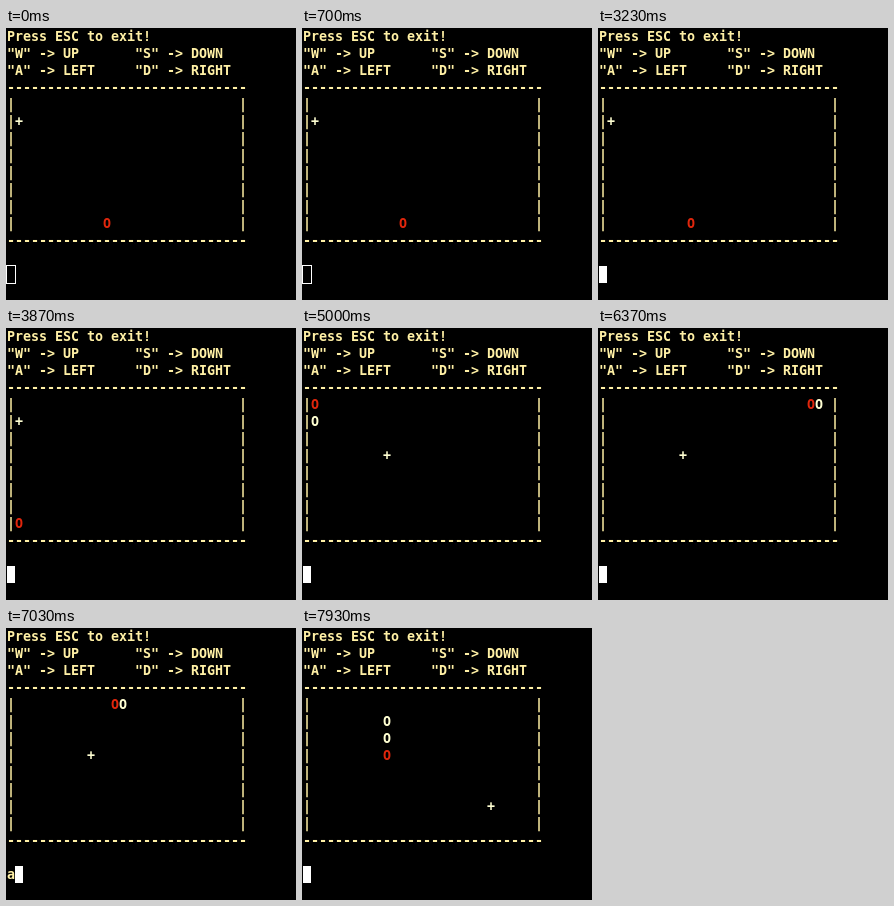
An HTML page with a canvas that plays this animation: 290 px wide and 272 px high, repeating every 8000 ms.

```html
<!DOCTYPE html>
<html lang="en">
<head>
<meta charset="utf-8">
<title>Terminal snake</title>
<style>
  html, body { margin: 0; width: 100%; height: 100%; overflow: hidden; background: #000; }
  canvas { display: block; }
</style>
</head>
<body>
<canvas id="screen" width="290" height="272"></canvas>
<script>
const ctx = document.getElementById('screen').getContext('2d');

const LOOP = 8000, TICK = 100 / 3, REPEAT = 47.8, FOCUS = 1500;
const CELL_W = 8, CELL_H = 17, LEFT = 1, BASELINE = 13;
const FIRST_COL = 1, LAST_COL = 28, PROMPT_ROW = 14;
const TEXT = '#fff0a5', PALE = '#ffffd2', HEAD = '#e0260c', CURSOR = '#fff';

const RULE = '-'.repeat(30);
const SIDE = '|' + ' '.repeat(28) + '|';
const BOARD = [
  'Press ESC to exit!',
  '"W" -> UP       "S" -> DOWN',
  '"A" -> LEFT     "D" -> RIGHT',
  RULE, ...Array(8).fill(SIDE), RULE
];

const DIRS = { w: [0, -1], a: [-1, 0], s: [0, 1], d: [1, 0] };
const FOODS = [[1, 5], [10, 7], [23, 10]];

// Key presses: start time, key, number of moves (held keys repeat)
const KEYS = [
  [2300, 'd', 1], [2700, 'a', 1], [3200, 'a', 11],
  [4100, 'w', 1], [4600, 'w', 6],
  [5430, 'a', 1], [5830, 'a', 1], [6366, 'a', 17],
  [7466, 's', 1], [7640, 's', 1], [7800, 's', 1]
];

function play(t) {
  let snake = [[12, 11]], eaten = 0, echo = '';
  for (const [start, key, count] of KEYS) {
    if (t < start) break;
    const pos = (t - start) / REPEAT;
    const moves = Math.min(count, Math.floor(pos) + 1);
    const [dx, dy] = DIRS[key];
    for (let i = 0; i < moves; i++) {
      let x = snake[0][0] + dx;
      const y = snake[0][1] + dy;
      if (x < FIRST_COL) x = LAST_COL;
      if (x > LAST_COL) x = FIRST_COL;
      snake.unshift([x, y]);
      const [fx, fy] = FOODS[eaten];
      if (x === fx && y === fy) eaten++;
      else snake.pop();
    }
    // The typed letter shows briefly before the next redraw
    echo = pos < count - 1 && pos % 1 > 0.8 ? key : '';
  }
  return { snake, food: FOODS[eaten], echo };
}

function put(text, col, row, color) {
  ctx.fillStyle = color;
  [...text].forEach((ch, i) => {
    if (ch !== ' ') ctx.fillText(ch, LEFT + (col + i) * CELL_W, row * CELL_H + BASELINE);
  });
}

function drawCursor(col, focused) {
  const x = LEFT + col * CELL_W, y = PROMPT_ROW * CELL_H;
  if (focused) {
    ctx.fillStyle = CURSOR;
    ctx.fillRect(x, y, CELL_W, CELL_H);
  } else {
    ctx.strokeStyle = CURSOR;
    ctx.lineWidth = 1;
    ctx.strokeRect(x - 0.5, y - 0.5, CELL_W + 1, CELL_H + 1);
  }
}

function draw(now) {
  const t = Math.floor((now % LOOP + 4) / TICK) * TICK % LOOP;
  const { snake, food, echo } = play(t);

  ctx.fillStyle = '#000';
  ctx.fillRect(0, 0, 290, 272);
  ctx.font = 'bold 13.333px "DejaVu Sans Mono", monospace';
  ctx.textBaseline = 'alphabetic';

  BOARD.forEach((line, row) => put(line, 0, row, TEXT));
  put('+', food[0], food[1], PALE);
  snake.forEach(([x, y], i) => put('O', x, y, i ? PALE : HEAD));
  put(echo, 0, PROMPT_ROW, TEXT);
  drawCursor(echo.length, t >= FOCUS);
}

const origin = performance.now();
function loop() {
  draw(performance.now() - origin);
  requestAnimationFrame(loop);
}
loop();
</script>
</body>
</html>
```
